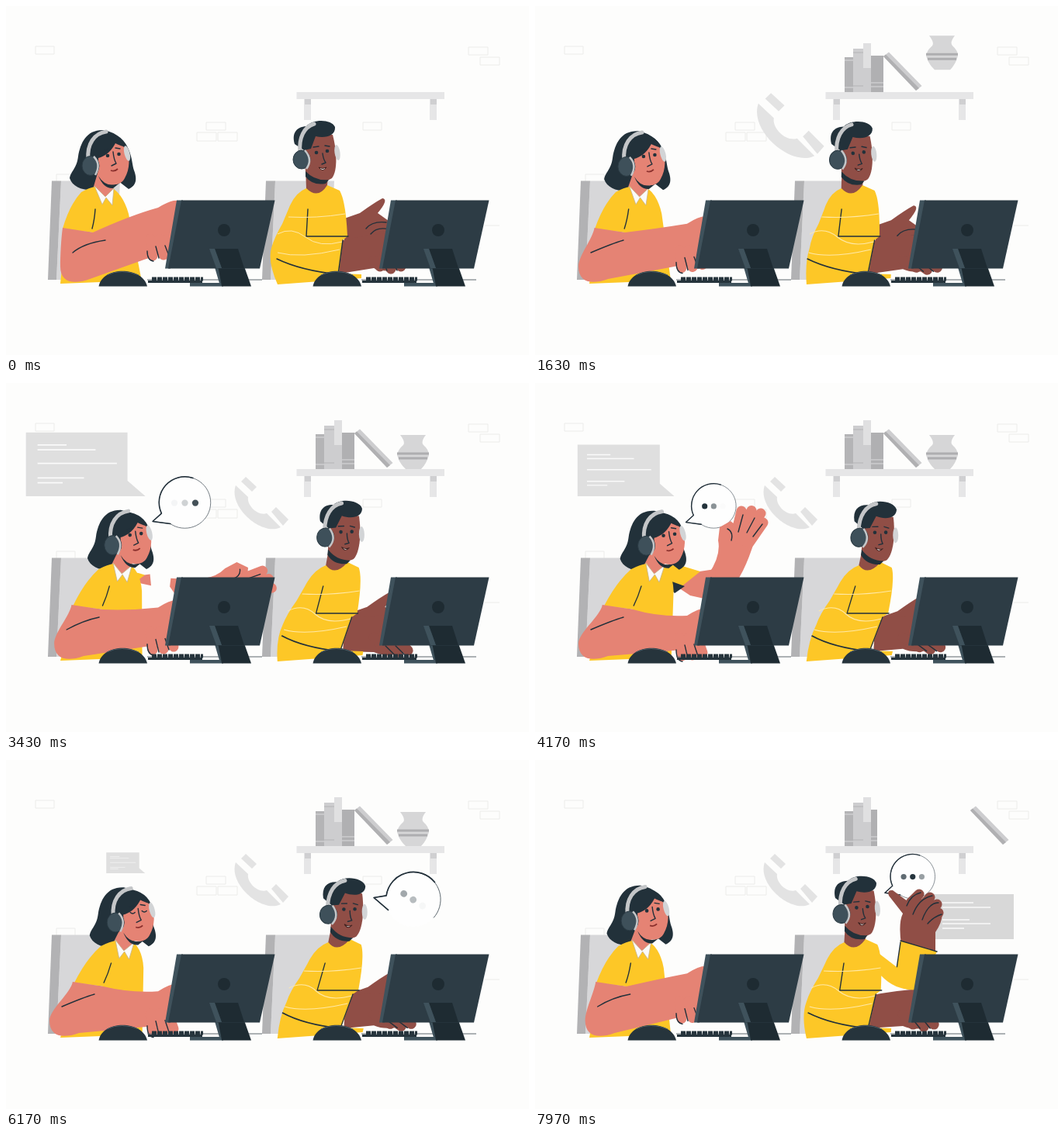
Animation, 674 px wide and 450 px high, one loop 8 s. Source, as an HTML page:

```html
<!DOCTYPE html>
<html lang="en">
<head>
<meta charset="utf-8">
<title>Call centre</title>
<style>
html, body { margin: 0; width: 100%; height: 100%; overflow: hidden; background: #fdfdfc; }
svg { display: block; width: 100vw; height: 100vh; }
.ln { fill: none; stroke: #22303a; stroke-width: 1.4; stroke-linecap: round; stroke-linejoin: round; }
.dark { fill: #22313a; }
.shirt { fill: #fdc727; }
.w { fill: #e58374; }
.m { fill: #904e46; }
.wf { fill: none; stroke: #e58374; stroke-linecap: round; stroke-width: 13; }
.mf { fill: none; stroke: #904e46; stroke-linecap: round; stroke-width: 13; }
.brick { fill: none; stroke: #ececea; stroke-width: 1; }
.pale { fill: none; stroke: #ffe9a8; stroke-width: 1; }
.text { stroke: #fafafa; stroke-width: 1.4; }
.band { fill: none; stroke: #c4c6c8; stroke-width: 5; stroke-linecap: round; }
.cup { fill: #3e505a; stroke: #2a3a43; }
.far { fill: #d2d4d6; }
.rim { stroke-width: .6; }
.bold { stroke-width: 1.5; }
</style>
</head>
<body>
<svg viewBox="0 0 674 450">
  <defs>
    <g id="chair">
      <path fill="#d7d7d9" d="M71 225.500H147L141 353H65Z"/>
      <path fill="#b2b2b4" d="M59 225.500H71L65 353H54Z"/>
    </g>
    <g id="desk">
      <path fill="none" stroke="#5c666c" d="M182 353H330"/>
      <path fill="#3f525c" d="M237 357H280V361.500H237Z M262 313H272L287 361H276Z M220 250.500H228L212 338.500H205Z"/>
      <path fill="#1e2b32" d="M269 313H299L316 361.500H278Z"/>
      <path fill="#2d3c45" d="M226 250.500H346.500L327 338.500H209Z"/>
      <path fill="#1e2b32" d="M269 313H299L307 338H278Z"/>
      <path fill="#3f525c" d="M262 313H269L278 338H271Z"/>
      <circle fill="#1e2b32" cx="281" cy="289" r="8"/>
      <path stroke="#26343c" stroke-width="5" stroke-dasharray="6 1" d="M188 352H254"/>
      <path stroke="#26343c" stroke-width="3" d="M183 355.500H253"/>
      <path fill="#26343c" d="M119.500 361.500C124 335 176 335 182 361.500Z"/>
      <path fill="none" stroke="#4c5c65" d="M130 347Q149 338 171 347"/>
    </g>
    <g id="bubble">
      <path fill="#fefefe" d="M22 3L0 0 11 -10A32 32 0 1 1 22 3"/>
      <path class="rim ln" pathLength="1" stroke-dasharray="1.010" d="M22 3L0 0 11 -10A32 32 0 1 1 22 3"/>
      <path class="bold ln" pathLength="1" stroke-dasharray="1.010" d="M22 3L0 0 11 -10A32 32 0 0 1 50 -54"/>
      <circle cx="27" cy="-23" r="4"/><circle cx="40" cy="-23" r="4"/><circle cx="53" cy="-23" r="4"/>
    </g>
  </defs>

  <path class="brick" d="M38 52h24v10h-24zM596 53h25v10h-25zM611 66h25v10h-25zM258 150h25v10h-25zM246 163h25v11h-25zM273 163h25v11h-25zM460 150h24v10h-24zM65 217h24v10h-24zM617 283h19"/>

  <g id="books">
    <g><path fill="#b4b4b6" d="M399 66h11v45h-11z"/><path stroke="#dadadc" d="M399 70h11M399 105h11"/></g>
    <g><path fill="#cdcdcf" d="M410 55h13v56h-13z"/><path stroke="#b4b4b6" d="M410 60h13M410 103h13"/></g>
    <g><path fill="#e0e0e1" d="M423 48h10v63h-10z"/><path fill="#cdcdcf" d="M423 80h10v31h-10z"/></g>
    <g><path fill="#b0b0b2" d="M433 64h8v47h-8z"/><path stroke="#dadadc" d="M433 99h8M433 104h8"/></g>
    <g><path fill="#b0b0b2" d="M441 64h8v47h-8z"/><path stroke="#dadadc" d="M441 99h8M441 104h8"/></g>
    <g><path fill="#cdcdcf" d="M449 65L456 59.500 498.500 103 491 109Z"/><path fill="#b0b0b2" d="M449 65L452 62.500 495 106 491 109Z"/></g>
    <g><path fill="#d6d6d7" d="M508 67H541Q534 76 538 80 545 86 545 93 542 104 535 111H515Q507 104 504 93 505 86 512 80 515 76 508 67Z"/><path stroke="#aeaeb0" stroke-width="3" d="M504 91H545M506 97H543"/></g>
  </g>
  <path fill="#e6e6e7" d="M374.500 111h190.500v9h-190.500zM384 120h9v27h-9zM546 120h9v27h-9z"/>
  <path fill="#cfcfd1" d="M385 120h8v7h-8zM547 120h8v7h-8z"/>

  <g id="phone" fill="#e3e3e3">
    <path d="M303 127L309 121 323 134 317 140Z M342 166L348 160 364 176 357 184Z M296 132L312 147C310 158 325 172 336 168L354 186C330 198 286 160 296 132Z"/>
  </g>

  <g id="panelW">
    <path fill="#dfdfdf" d="M56 80H161V130L179.500 146H56Z"/>
    <path class="text" d="M68 93h30M68 98h60M68 112h82M68 127h48M68 132h26"/>
  </g>
  <g id="panelM">
    <path fill="#d8d8d8" d="M512 173H617V231H494L512 217Z"/>
    <path class="text" d="M525 184h40M525 190h62M525 206h35M525 211h62M525 217h28"/>
  </g>

  <use href="#chair"/><use href="#chair" x="276"/>

  <g id="bubW"></g>
  <g id="bubM"></g>

  <!-- woman -->
  <g id="waveW">
    <path id="foreW" class="w"/>
    <g id="handW">
      <path class="w" d="M207 268L224 246Q240 222 236 203L238 186 252 178 262 186 284 200Q276 226 268 242L250 275H215Z"/>
      <path class="wf" d="M258 198L266 165M264 202L279 164.500M270 204L291 168M276 206L294 180"/>
      <path class="ln" d="M262 192L268 170M273 193L283 174M281 198L293 182M248 188Q256 192 253 203"/>
    </g>
    <g id="sleeveW">
      <path class="w" d="M182 262L212 243 232 240 236 282 200 274Z"/>
      <path class="shirt" d="M160 234L190 236 213 243 188 263 160 266Z"/>
      <path class="dark" d="M160 250L193 262 180 271Z"/>
    </g>
  </g>
  <path id="hairW" class="dark" d="M126 160C104 159 96 176 93 194 91 210 84 212 82 222 86 235 105 240 119 236L140 222 158 236C170 231 168 220 165 212 161 202 164 168 126 160Z"/>
  <g id="bodyW">
    <path class="w" d="M119 212L140 222 138 240 126 252 112 236Z"/>
    <path class="shirt" d="M97 240Q107 234 116 233L126 250 139 236Q152 246 158 268L174 350 172 354 70 358 76 300 112 292 73 287Q82 256 97 240Z"/>
    <path fill="#fafafa" stroke="#c8b487" stroke-width=".8" d="M114 232L124 256 129 247 137 257 139 235 128 246Z"/>
    <path class="ln" d="M115 262Q114 276 111 287M75 289L111 293"/>
  </g>
  <g id="headW">
    <path class="dark" d="M119 219Q130 237 148 227L138 235Q126 236 119 219Z"/>
    <path class="dark" d="M110 196Q108 168 126 163 150 166 156 186L141 190 122 216Z"/>
    <path class="w" d="M141 177C134 190 126 194 119 196L119 215C124 231 146 236 153 222 160 210 160 194 155 184 151 180 146 180 141 177Z"/>
    <ellipse class="far" cx="156" cy="190" rx="3.500" ry="10" transform="rotate(-14 156 190)"/>
    <path class="band" d="M106 198C104 178 114 164 129 162"/>
    <ellipse class="cup" cx="109" cy="206" rx="11" ry="12.500"/>
    <path fill="none" stroke="#c4c6c8" stroke-width="2.500" d="M113 194Q123 204 115 218"/>
    <path class="ln" d="M127 186l6-2M141 183l6 1M138 188Q139 198 142 203L136 206"/>
    <path fill="none" stroke="#8a2f2c" stroke-width="1.800" d="M135 212Q140 214 144 210"/>
    <g class="eyes dark"><circle cx="131" cy="193" r="2.300"/><circle cx="145.500" cy="191" r="2.300"/></g>
    <path class="lids ln" d="M128 193q3 3 6 0M143 191q3 3 6 0"/>
  </g>
  <path id="armW" class="w"/>
  <path id="fingersW" class="wf"/>
  <path id="creaseW" class="ln"/>

  <!-- man -->
  <g id="handM">
    <path class="m" d="M436 274L456 267Q474 254 485 248 494 249 479 267L500 282V302H436Z"/>
    <path class="ln" d="M464 287Q472 277 490 279M470 294Q478 284 494 288"/>
  </g>
  <path id="armM" class="m"/>
  <path id="fingersM" class="mf"/>
  <path id="creaseM" class="ln"/>
  <g id="waveM">
    <g id="foreM">
      <path class="m" d="M472 238Q468 210 474 198L456 175Q453 167 461 168L480 182 492 176 524 194Q527 206 516 222L516 246Z"/>
      <path class="mf" d="M484 184L495 173M494 194L509 177M504 203L518 186M510 209L520 197"/>
      <path class="ln" d="M479 188Q484 174 497 171M487 199Q495 178 512 175M499 206Q507 184 520 184M506 211Q514 202 524 199"/>
      <path class="shirt" d="M471 233L518 247 494 295Q478 300 464 286Z"/>
      <path class="ln" d="M471 233L518 247M471 235L464 283"/>
    </g>
    <path id="sleeveM" class="shirt" d="M428 238Q438 240 444 250L470 270 492 296Q465 298 446 278L430 266Z"/>
  </g>
  <g id="bodyM">
    <path class="m" d="M386 205L415 220 413 241 402 248 387 238Z"/>
    <path id="shirtM" class="shirt"/>
    <path class="ln" d="M389 262L387 297H441M349 326Q380 341 428 346L434 302"/>
    <path class="pale" d="M350 294Q368 284 386 298T433 304M364 272Q400 274 437 268M350 318Q380 326 430 314"/>
  </g>
  <g id="headM">
    <path class="m" d="M384 172L398 165 421 166C426 185 428 212 420 222 410 229 394 225 386 214Z"/>
    <path class="dark" d="M386 213Q398 226 416 224L412 229Q395 232 386 220Z"/>
    <path class="dark" d="M372 178C368 164 374 156 387 155 396 145 420 146 424 156 425 167 412 171 399 168L393 184 384 186Z"/>
    <ellipse class="far" cx="427" cy="189" rx="3.500" ry="10" transform="rotate(-8 427 189)"/>
    <path class="band" d="M379 189C377 170 384 156 397 152"/>
    <ellipse class="cup" cx="381" cy="198" rx="11" ry="12"/>
    <path fill="none" stroke="#c4c6c8" stroke-width="2.500" d="M385 186Q396 198 387 210"/>
    <path class="ln" d="M396 182l7-1M411 180l6 1M408 190Q409 198 412 202L407 204"/>
    <path fill="#fff" stroke="#40201e" d="M403 208Q408 211 413 208 408 215 403 208Z"/>
    <g class="eyes dark"><circle cx="400" cy="189" r="2.300"/><circle cx="414" cy="187" r="2.300"/></g>
    <path class="lids ln" d="M397 189q3 3 6 0M411 187q3 3 6 0"/>
  </g>

  <use href="#desk"/><use href="#desk" x="276"/>
</svg>
<script>
const LOOP = 8000;
const $ = id => document.getElementById(id);
const clamp = x => Math.max(0, Math.min(1, x));
const smooth = x => (x = clamp(x), x * x * (3 - 2 * x));
const span = (t, from, ms) => clamp((t - from) / ms);
const move = (id, value) => $(id).setAttribute('transform', value);
const shape = (id, d) => $(id).setAttribute('d', d);
const show = (el, on) => { el.style.display = on ? '' : 'none'; };
const about = (x, y, op) => `translate(${x} ${y}) ${op} translate(${-x} ${-y})`;

// Springy arrival that overshoots, and a departure that winds up first.
const pop = u => u <= 0 ? 0 : 1 - Math.exp(-u / 380 - (u / 700) ** 2) * Math.cos(u / 110);
const leave = x => Math.max(0, 1 - (3.6 * x ** 3 - 2.6 * x ** 2));

function linear(t, keys) {
  const i = Math.max(1, keys.findIndex(k => k[0] >= t));
  const [a, b] = [keys[i - 1], keys[i]];
  return a[1] + (b[1] - a[1]) * (t - a[0]) / (b[0] - a[0]);
}

const typing = [[0, 0], [1630, 5], [2730, 8], [4170, 11], [5130, 14], [6170, 17], [8000, 21.65]];

for (const id of ['bubW', 'bubM']) $(id).innerHTML = $('bubble').innerHTML;

function drawBubble(id, x, y, u, out) {
  const el = $(id);
  show(el, u > 0 && out > 0);
  if (u <= 0) return;
  const settle = smooth((u - 230) / 600);
  const pulse = 0.96 + 0.08 * Math.cos(2 * Math.PI * (u - 1000) / 1700);
  const size = (1.1 + (pulse - 1.1) * settle) * out;
  el.setAttribute('transform', `translate(${x} ${y}) rotate(${33 * (1 - settle)}) scale(${size})`);
  el.querySelector('.rim').style.strokeDashoffset = 1.01 * (1 - clamp(u / 330));
  el.querySelector('.bold').style.strokeDashoffset = 1.01 * (1 - clamp(u / 180));
  el.querySelectorAll('circle').forEach((dot, i) => {
    const wave = 0.5 + 0.5 * Math.cos(2 * Math.PI * (u / 1800 - 0.95 - i * 0.22));
    dot.setAttribute('opacity', wave * clamp((u - i * 100) / 400));
    dot.setAttribute('fill', '#22313a');
  });
}

function drawShelf(t) {
  [...$('books').children].forEach((el, i) => {
    const start = i < 6 ? 120 + i * 160 : 1250;
    const fall = 1 - span(t, start, 560);
    const lead = i === 5 ? 7580 : 7480;
    const slide = i > 3 ? 300 * span(t, lead, 640) ** 2 : 0;
    el.setAttribute('transform', `translate(${slide} ${-120 * fall ** 1.25})`);
    show(el, t > start && !(i > 3 && i !== 5 && t > 7940));
  });
  const ring = span(t, 4850, 700);
  const shake = 13 * Math.sin(Math.PI * ring) * Math.sin(2 * Math.PI * 3.1 * ring);
  move('phone', about(329, 157, `rotate(${shake}) scale(${pop(t - 1400)})`));
}

function lean(id, amount) {
  const k = amount / 151;
  move(id, `matrix(1 0 ${-k} 1 ${358 * k} 0)`);
}

function blink(head, closed) {
  show($(head).querySelector('.eyes'), !closed);
  show($(head).querySelector('.lids'), closed);
}

function drawWoman(t, tilt, tap) {
  const L = 37 * tilt, e = -14 * tap, h = 0.75 * L + 14 * tap;
  lean('bodyW', L);
  move('headW', `translate(${L} ${4 * tilt})`);
  move('hairW', `translate(${0.8 * L} ${5 * tilt})`);
  const a = 73 + 0.4 * L, b = 112 + 0.42 * L;
  shape('armW', `M${a} 286C${a - 2} 300 ${70 + e} 322 ${70 + e} 336
    C${70 + e} 356 ${86 + e} 360 ${108 + e} 352L178 ${327 + h * 0.45}L206 ${318 + h * 0.6}
    L226 ${290 + h * 0.6}L222 ${251 + h}Q214 ${249 + h} 196 ${260 + h}Q160 ${270 + h * 0.8} ${b} 292Z`);
  const tips = [[186, 189, 322], [198, 203, 321], [209, 216, 318]];
  shape('fingersW', tips.map(([x, tx, y]) =>
    `M${x} ${300 + h * 0.7}L${tx} ${y + h * 0.75}`).join(''));
  shape('creaseW', `M${86 + e} 318Q100 306 ${128 + e} 302
    M193 ${310 + h * 0.7}L197 ${325 + h * 0.75}M205 ${309 + h * 0.7}L210 ${322 + h * 0.75}
    M182 ${316 + h * 0.7}Q182 ${328 + h * 0.75} 190 ${329 + h * 0.75}`);

  const up = smooth(span(t, 3250, 450)) * (1 - smooth(span(t, 5450, 450)));
  show($('waveW'), up > 0);
  const sway = 1.5 - 1.5 * Math.cos(Math.PI * (t - 4170) / 320);
  move('handW', `rotate(${85 * (1 - up) + sway} 225 265)`);
  move('sleeveW', about(160, 250, `scale(${up})`));
  blink('headW', (t > 6090 && t < 6250) || (t > 2150 && t < 2300));
  move('panelW', about(179, 146, `scale(${pop(t - 3200) * leave(span(t, 5620, 600))})`));
  drawBubble('bubW', 162 + 0.94 * L, 173 + 0.19 * L, t - 2500, leave(span(t, 5450, 600)));
}

function drawMan(t, tilt, tap) {
  const L = 40 * tilt, q = 9 * tap;
  lean('bodyM', L);
  move('headM', `translate(${0.88 * L} ${4 * tilt}) rotate(${8 * tilt} 402 228)`);
  shape('shirtM', `M387 235Q402 250 414 231L430 238Q438 252 440 297L434 302 429 345 458 346V351
    L350 359Q${337 + q} 330 ${342 + q} 312Q${346 + q * 0.7} 298 ${356 + q * 0.5} 281
    L${364 + q * 0.3} 262Q372 241 387 235Z`);
  const up = smooth(span(t, 6650, 450)), y = 0.65 * L + 3 * tap;
  const drop = tilt * (20 - 15 * tap), cuff = 432 + 0.33 * L;
  move('handM', `translate(${0.3 * L} ${y})`);
  show($('handM'), up < 0.3);
  shape('armM', `M${cuff - 6} 304Q465 ${294 + 0.2 * L} 505 ${292 + 0.2 * L}
    L514 ${338 + drop}Q490 ${345 + drop} 474 ${338 + drop}L${cuff - 8} 346Z`);
  const fingers = [482, 496, 509];
  shape('fingersM', fingers.map((x, i) => `M${x - 8} 328L${x + 0.15 * L + 8 * tap} ${336 + drop + 3 * (i % 2)}`).join(''));
  shape('creaseM', fingers.slice(1).map(x => `M${x - 10 + 0.1 * L} ${330 + drop}L${x - 5 + 0.15 * L + 8 * tap} ${341 + drop}`).join(''));

  show($('waveM'), up > 0);
  const sway = up === 1 ? 2 * Math.sin(Math.PI * (t - 7970) / 320) : 0;
  move('foreM', `rotate(${80 * (1 - up) + sway} 485 290)`);
  move('sleeveM', about(430, 250, `scale(${up})`));
  blink('headM', (t > 3500 && t < 3640) || (t > 7300 && t < 7440));
  move('panelM', about(494, 231, `scale(${pop(t - 6520)})`));
  drawBubble('bubM', 435 + 1.12 * L, 167 + 0.3 * L, t - 5940, 1);
}

function draw(t) {
  const tilt = Math.sin(Math.PI * t / 10000) ** 2;
  const tap = (1 - Math.cos(Math.PI * linear(t, typing))) / 2;
  drawShelf(t);
  drawWoman(t, tilt, tap);
  drawMan(t, tilt, tap);
}

const begin = performance.now();
function tick() {
  draw((performance.now() - begin) % LOOP);
  requestAnimationFrame(tick);
}
draw(0);
requestAnimationFrame(tick);
</script>
</body>
</html>
```
